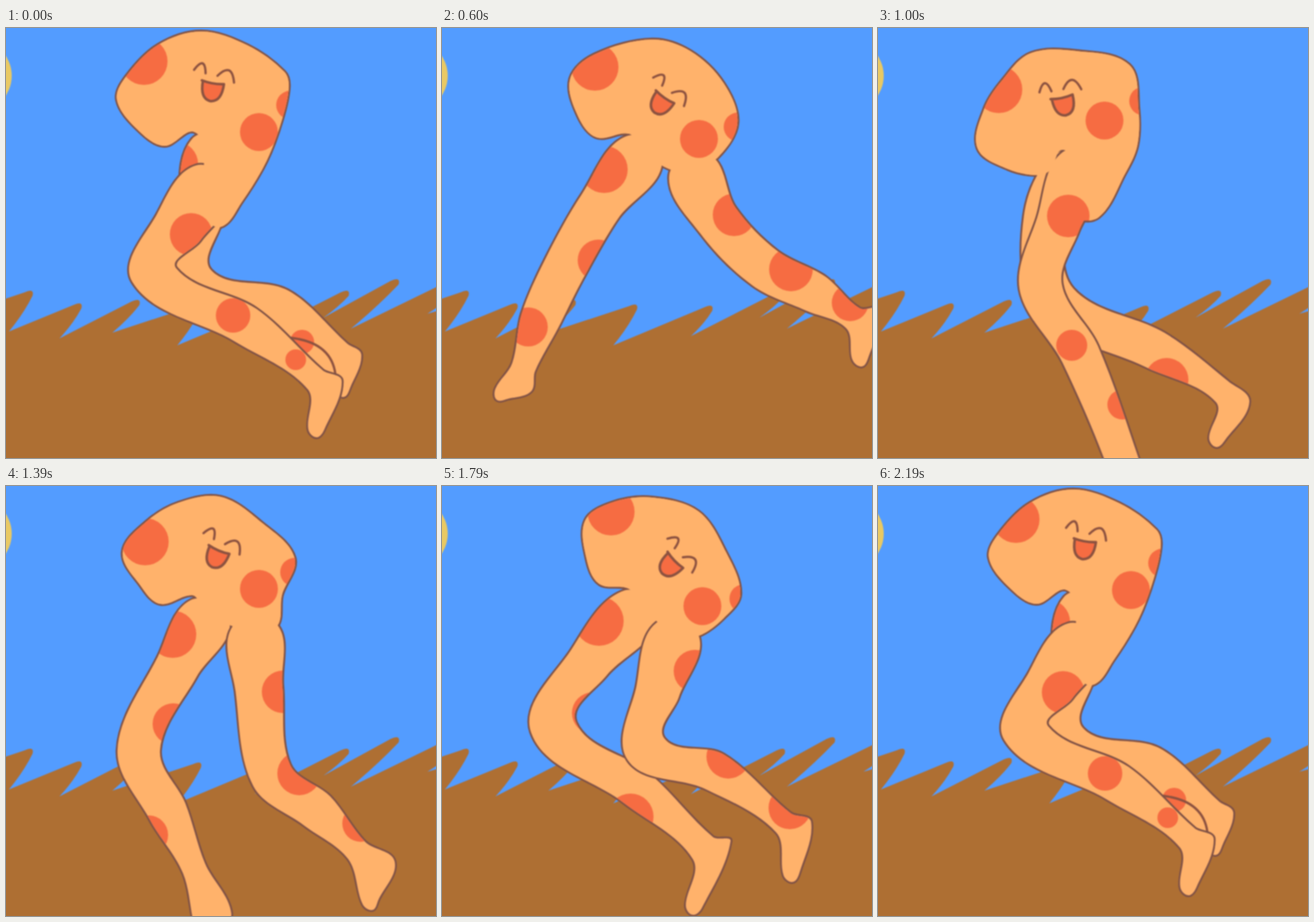
These frames come from a looping animation (748 px wide and 748 px high, 2.39 s). An HTML page:

```html
<!DOCTYPE html>
<html lang="en">
<head>
<meta charset="utf-8">
<title>Running spotted legs</title>
<style>
  html, body { margin: 0; width: 100%; height: 100%; overflow: hidden; background: #539cff; }
  svg { display: block; width: 100%; height: 100%; overflow: hidden; }
  #scene { filter: blur(1.2px); }
  .skin, .cover { fill: #ffb26b; }
  .skin { stroke: #805245; stroke-width: 6.5; stroke-linejoin: round; paint-order: stroke; }
  .spot { fill: #f66c42; }
  .crease, .face { fill: none; stroke: #8c5240; stroke-width: 4; stroke-linecap: round; stroke-linejoin: round; }
  .face .mouth { fill: #f66c42; stroke-width: 4.5; }
</style>
</head>
<body>
<svg viewBox="0 0 748 748">
  <g id="scene">
    <rect x="-10" y="-10" width="768" height="768" fill="#539cff"/>
    <circle cx="-53" cy="83" r="63" fill="#e9c963"/>
    <path id="grass" fill="#ae6f33"/>
    <g id="runner"></g>
  </g>
</svg>
<script>
// Legs run hip, thigh, knee, shin, ankle (optional own half width), then heel and toe.
// Spots are [x, y] with an optional radius; the face is [x, y, angle].
const poses = {
  tuck: {
    body: [[275, 205], [228, 176], [193, 125], [209, 84], [265, 29], [340, 6], [420, 30], [484, 76], [492, 102],
      [480, 160], [453, 232], [410, 303], [374, 346], [345, 325], [345, 250], [330, 182]],
    far: [[362, 200], [338, 330], [325, 440], [466, 500, 50], [575, 575, 32], [618, 568], [585, 628]],
    near: [[362, 262], [300, 347, 44], [258, 430, 40], [417, 517], [538, 612], [584, 614], [540, 698]],
    farSpots: [[296, 236], [515, 546, 21]],
    spots: [[240, 58], [440, 181], [495, 134], [322, 359], [395, 500, 30], [504, 577, 18]],
    crease: "M485 538 Q565 543 573 602",
    face: [362, 75, 17]
  },
  step: {
    body: [[268, 205], [233, 172], [203, 115], [243, 63], [300, 29], [374, 19], [444, 63], [502, 125],
      [480, 190], [471, 245], [430, 252], [385, 240], [342, 210], [324, 190]],
    far: [[356, 218], [298, 314], [231, 459], [281, 566], [327, 665], [392, 744], [345, 775]],
    near: [[432, 243], [440, 352, 41], [462, 503], [541, 565], [610, 634], [676, 653], [634, 724]],
    farSpots: [[290, 258, 41], [291, 414], [248, 607]],
    spots: [[242, 97], [440, 179], [502, 150], [482, 358], [510, 500], [617, 587]],
    face: [377, 92, 30]
  },
  stride: {
    body: [[268, 190], [235, 150], [223, 88], [265, 46], [365, 20], [432, 40], [490, 96], [514, 165],
      [480, 225], [430, 252], [380, 238], [345, 207], [325, 184]],
    far: [[352, 212], [275, 310], [212, 420], [170, 510], [142, 590], [155, 632], [104, 636]],
    near: [[430, 238], [480, 335], [562, 418], [650, 462], [715, 505], [765, 490], [728, 575]],
    farSpots: [[282, 246, 41], [272, 404], [150, 520]],
    spots: [[266, 68], [447, 193], [515, 172], [508, 325], [607, 420], [710, 478]],
    face: [398, 103, 42]
  },
  bend: {
    body: [[273, 170], [251, 125], [249, 60], [295, 29], [365, 20], [446, 44], [494, 115], [519, 188],
      [490, 230], [446, 261], [410, 262], [372, 234], [345, 208], [325, 179]],
    far: [[346, 208], [255, 308], [194, 420, 40], [338, 525], [454, 630, 26], [502, 618], [438, 732]],
    near: [[410, 250], [375, 358], [355, 458], [474, 497], [594, 586], [642, 584], [608, 675]],
    farSpots: [[273, 235, 43], [262, 395], [328, 575, 40]],
    spots: [[294, 45], [453, 209], [525, 196], [440, 322], [498, 471], [605, 560, 37]],
    face: [419, 114, 53]
  },
  pass: {
    body: [[278, 256], [225, 245], [173, 209], [185, 140], [216, 91], [265, 44], [345, 40], [437, 64],
      [453, 140], [451, 205], [429, 255], [384, 329], [342, 325], [345, 250], [322, 212], [300, 247]],
    far: [[350, 235], [291, 335], [310, 475], [482, 560], [599, 633], [646, 650], [590, 715]],
    near: [[358, 230], [313, 342], [283, 450], [352, 568], [438, 790, 28], [480, 830], [430, 860]],
    farSpots: [[502, 612]],
    spots: [[210, 107], [394, 161], [462, 127], [331, 327], [337, 552, 27], [425, 655, 26]],
    face: [314, 101, -5]
  }
};
const LEG_WIDTHS = [39, 38, 37, 34, 21];
const FAR_RADII = [38, 36, 34];
const RADII = [41, 33, 25, 37, 38, 32];
const TOE = 14;

const add = ([x, y], [u, v], k = 1) => [x + u * k, y + v * k];
const unit = (a, b) => {
  const d = Math.hypot(b[0] - a[0], b[1] - a[1]) || 1;
  return [(b[0] - a[0]) / d, (b[1] - a[1]) / d];
};
const turn = ([x, y]) => [-y, x];

// Closed smooth curve; handles are a third of each span.
function smooth(points) {
  const n = points.length;
  const at = i => points[(i + n) % n];
  const tangent = i => unit(at(i - 1), at(i + 1));
  let d = `M${at(0)}`;
  for (let i = 0; i < n; i++) {
    const a = at(i), b = at(i + 1);
    const reach = Math.hypot(b[0] - a[0], b[1] - a[1]) / 3;
    d += `C${add(a, tangent(i), reach)} ${add(b, tangent(i + 1), -reach)} ${b}`;
  }
  return d + "Z";
}

// Tapered tube around the joints, closed by a rounded foot.
function legPath(points) {
  const joints = points.slice(0, 5);
  const [heel, toe] = points.slice(5);
  const front = [], back = [];
  joints.forEach((p, i) => {
    const into = unit(joints[Math.max(i - 1, 0)], p);
    const out = unit(p, joints[Math.min(i + 1, 4)]);
    const side = turn(unit([0, 0], add(into, out)));
    const w = p[2] ?? LEG_WIDTHS[i];
    front.push(add(p, side, w));
    back.unshift(add(p, side, -w));
  });
  const dir = unit(joints[4], toe), side = turn(dir);
  return smooth([...front, add(toe, side, TOE), add(toe, dir, TOE), add(toe, side, -TOE), heel, ...back]);
}

const path = (cls, d) => `<path class="${cls}" d="${d}"/>`;

function drawSpots(spots, radii, id, shapes) {
  const clip = shapes.map(d => `<path d="${d}"/>`).join("");
  const dots = spots.map(([x, y, r], i) => `<circle class="spot" cx="${x}" cy="${y}" r="${r ?? radii[i]}"/>`).join("");
  return `<clipPath id="${id}">${clip}</clipPath><g clip-path="url(#${id})">${dots}</g>`;
}

const drawFace = ([x, y, angle]) =>
  `<g class="face" transform="translate(${x} ${y}) rotate(${angle})">
    <path d="M-34 8 Q-23 -22 -13 8 M8 6 Q25 -25 39 9"/>
    <path class="mouth" transform="translate(6 34) rotate(-7)" d="M-20 -15 Q0 -11 19 -15 Q20 17 0 18 Q-18 16 -18 -14"/>
  </g>`;

function drawPose([name, pose]) {
  const body = smooth(pose.body), far = legPath(pose.far), near = legPath(pose.near);
  return `<g id="${name}" display="none">` +
    path("skin", body) + path("skin", far) +
    drawSpots(pose.farSpots, FAR_RADII, name + "Far", [far]) +
    (pose.crease ? path("crease", pose.crease) : "") +
    path("skin", near) + path("cover", body) +
    drawSpots(pose.spots, RADII, name + "Near", [near, body]) +
    drawFace(pose.face) + "</g>";
}

// Each tuft leans right: tip x, tip y, then the notch below it.
const tufts = [
  [47, 457, 5, 528], [132, 479, 93, 540], [233, 473, 185, 530], [340, 481, 298, 552],
  [471, 483, 433, 536], [597, 457, 552, 504], [684, 437, 600, 523]
];
const tuftPath = ([x, y, u, v]) =>
  `L${x - 15} ${y + 3}Q${x + 3} ${y - 5} ${x - 1} ${y + 9}Q${(x + u) / 2 + 5} ${(y + v) / 2 + 4} ${u} ${v}`;
document.getElementById("grass").setAttribute("d",
  "M-10 474" + tufts.map(tuftPath).join("") + "L758 446V481L733 497L758 490V758H-10Z");

document.getElementById("runner").innerHTML = Object.entries(poses).map(drawPose).join("");
const groups = Object.keys(poses).map(name => document.getElementById(name));

const LOOP = 2390, BEAT = 200, SHORT_BEAT_END = 1390;
const cycle = ["pass", "tuck", "step", "stride", "bend"];
const start = performance.now();

function render() {
  const t = (performance.now() - start) % LOOP;
  // One beat is 10 ms short; the first pose is held for two beats.
  const beat = Math.floor((t >= SHORT_BEAT_END ? t + 10 : t) / BEAT);
  const current = cycle[Math.max(beat, 1) % cycle.length];
  for (const g of groups) g.setAttribute("display", g.id === current ? "inline" : "none");
  requestAnimationFrame(render);
}
render();
</script>
</body>
</html>
```
